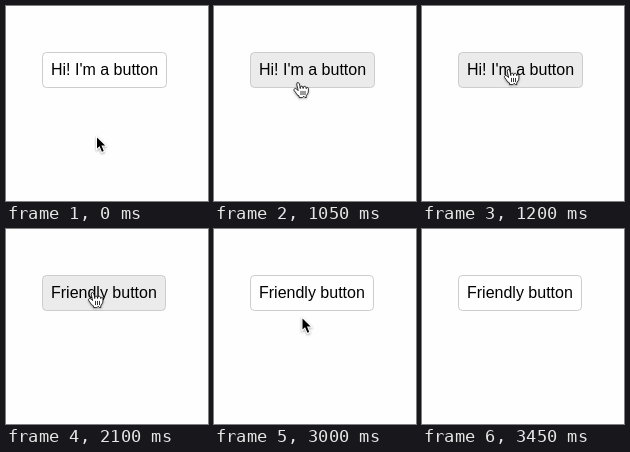
An HTML page that plays this animation: 202x195 px, repeating every 3950 ms.

```html
<!DOCTYPE html>
<html lang="en">
<head>
<meta charset="utf-8">
<title>Button click</title>
<style>
  html, body { margin: 0; width: 100%; height: 100%; overflow: hidden; background: #fefefe; }
  svg { display: block; width: 100%; height: 100%; }
  text { font: 16px "Liberation Sans", Arial, sans-serif; }
  .cursor { filter: drop-shadow(0 1px 1px rgba(0, 0, 0, .35)); }
</style>
</head>
<body>
<svg viewBox="0 0 202 195">
  <rect id="box" x="36.5" y="46.5" height="35" rx="4" stroke="#ccc"/>
  <text id="label" x="45" y="69"></text>
  <circle id="ring" cx="87.5" cy="61.5" r="10" fill="none" stroke="#000"/>
  <g id="arrow" class="cursor">
    <path fill="#fff" d="M0 0V16L4.4 11.7L4.8 11.6H11.6ZM.8 7.1L5.5 18.2L9.1 16.7L4.5 5.6Z"/>
    <path d="M1 2.4V13.6L4 10.7L4.4 10.6H9.2Z"/>
    <path d="M4.3 8.7h2v8h-2z" transform="rotate(-22.7 5.3 12.7)"/>
  </g>
  <g id="hand" class="cursor" stroke="#000" stroke-width=".8" stroke-linejoin="round" stroke-linecap="round">
    <path fill="#fff" d="M3.3 12.4L2.1 10.4L.7 8.6L.5 7.5L1.1 6.7L1.9 6.4L3.3 7.1L4.6 8.6L4.2 6.4
      L3.6 4L3.3 2.3L3.6.8L4.2.4L4.9.6L5.8 1.9L6.3 3.8L6.8 6.6L6.8 5.1L7.5 4.3L8.4 4.2L9.2 4.7
      L9.6 6.5L9.9 4.9L10.6 4.4L11.6 4.4L12.3 4.9L12.7 6.6L13 5.9L13.8 5.5L14.6 5.7L14.9 6.5
      V8.8L14.7 10.5L14 11.9L12.8 13.7L12.7 14.7L12.8 15.6H11.6L10.6 14.5H9.9L8.8 15.6H5.7
      L5.5 14.2Z"/>
    <path d="M7.5 9.3V12.7M9.5 9.3V12.7M11.5 9.3V12.7"/>
  </g>
</svg>
<script>
const LOOP = 3950;
const [box, label, ring, arrow, hand] =
  ["box", "label", "ring", "arrow", "hand"].map(id => document.getElementById(id));

// Each step holds until the next: start time, cursor, position
const steps = [
  [0, arrow, 90, 129],
  [900, arrow, 85.5, 102],
  [1050, hand, 79.5, 76],
  [1200, hand, 82, 63],
  [3000, arrow, 87.5, 87],
  [3150, arrow, 97.5, 149],
  [3300, arrow, 127.5, 190],
  [3450, null]
];

const show = (element, visible) =>
  element.setAttribute("visibility", visible ? "visible" : "hidden");

function draw(now) {
  const time = now % LOOP;
  const [, cursor, x, y] = steps.findLast(([start]) => time >= start);
  const clicked = time >= 2100;

  for (const shape of [arrow, hand]) show(shape, shape === cursor);
  if (cursor) cursor.setAttribute("transform", `translate(${x} ${y})`);
  show(ring, time >= 1950 && !clicked);

  box.setAttribute("width", clicked ? 123 : 124);
  box.setAttribute("fill", cursor === hand ? "#ebebeb" : "#fefefe");
  label.textContent = clicked ? "Friendly button" : "Hi! I'm a button";
}

let origin;
function tick(now) {
  origin ??= now;
  draw(now - origin);
  requestAnimationFrame(tick);
}
draw(0);
requestAnimationFrame(tick);
</script>
</body>
</html>
```
